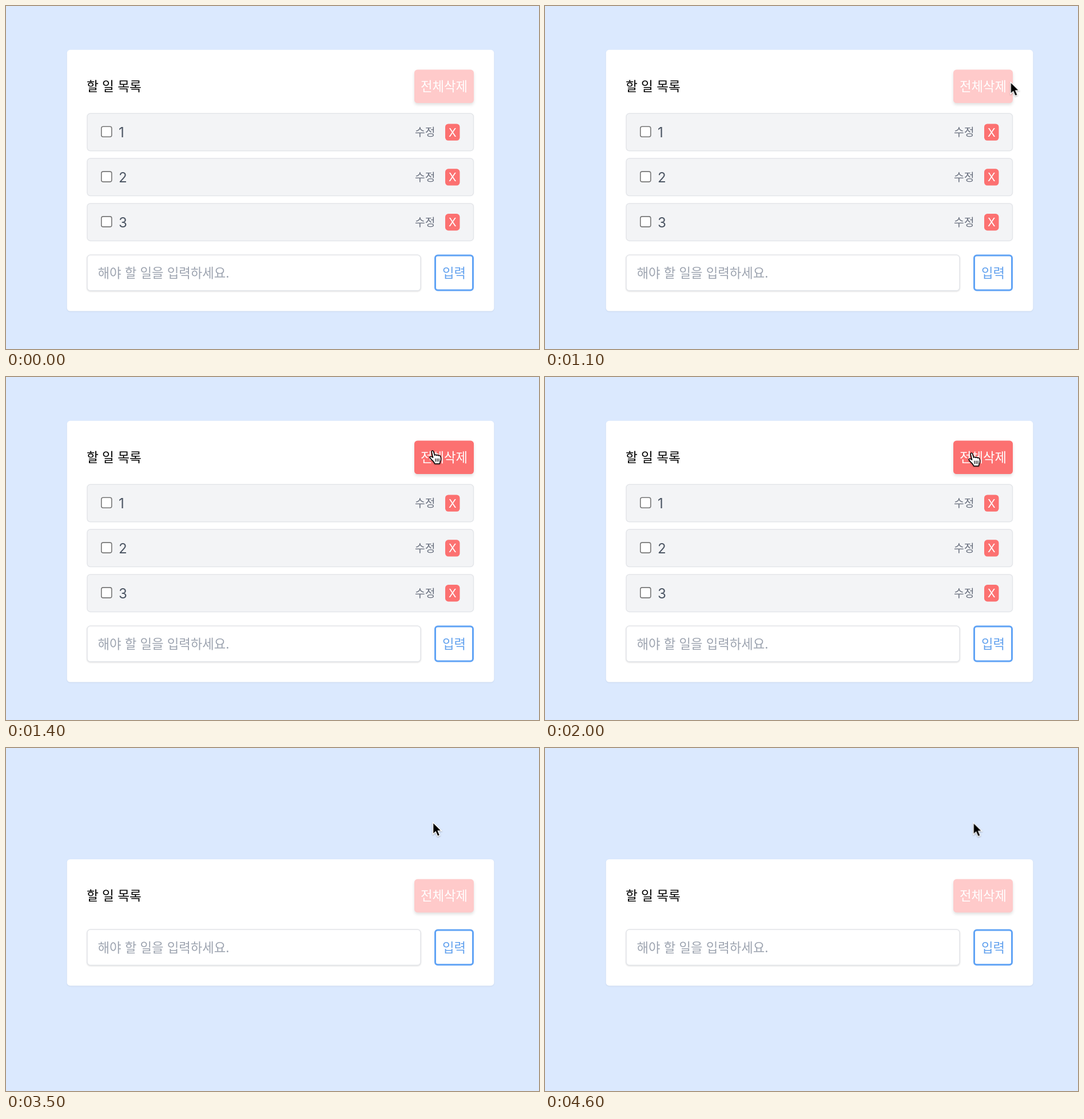
An HTML page that plays this animation: 932 px wide and 601 px high, repeating every 5000 ms.

```html
<!DOCTYPE html>
<html lang="ko">
<head>
<meta charset="utf-8">
<title>할 일 목록</title>
<style>
  html, body { margin: 0; width: 100%; height: 100%; overflow: hidden; background: #dbe9fe; }
  svg { display: block; width: 932px; height: 601px; }
  text { font: 22.3px "Noto Sans CJK KR", "Noto Sans CJK", "Noto Sans CJK JP", sans-serif; }
  .num { font: 24px Inter, sans-serif; fill: #4b5563; }
  .x { font: 20px Inter, sans-serif; fill: #fff; text-anchor: middle; }
  .edit { font-size: 19.3px; fill: #6b7280; }
  .hint { fill: #9ca3af; }
  .line { stroke: #e3e5e9; stroke-width: 1.5; }
  .card { fill: #fff; filter: drop-shadow(0 1px 1px rgb(0 0 0 / .07)); }
  .field { fill: #fff; filter: drop-shadow(0 1.5px 1.2px rgb(0 0 0 / .12)); }
  .clear { fill: #ffcaca; filter: drop-shadow(0 3px 2.5px rgb(0 0 0 / .12)); }
  .arrow, .hand { filter: drop-shadow(0 1px 1px rgb(0 0 0 / .3)); }

  .full, .short, .head, .foot, .clear, .cursor, .arrow, .hand {
    animation: 5s step-end infinite;
  }
  .full { animation-name: full; }
  .short { animation-name: short; }
  .head { animation-name: head; }
  .foot { animation-name: foot; }
  .clear { animation-name: hover; }
  .cursor { animation-name: move; }
  .arrow { animation-name: arrow; }
  .hand { animation-name: hand; }

  @keyframes full { 0% { visibility: visible } 50%, 100% { visibility: hidden } }
  @keyframes short { 0% { visibility: hidden } 50%, 100% { visibility: visible } }
  @keyframes head { 0% { transform: none } 50%, 100% { transform: translateY(118.2px) } }
  @keyframes foot { 0% { transform: none } 50%, 100% { transform: translateY(-118.2px) } }
  @keyframes hover { 0%, 50%, 100% { fill: #ffcaca } 24% { fill: #fc7171 } }
  @keyframes arrow {
    0%, 6%, 24% { visibility: hidden }
    2%, 12%, 50%, 100% { visibility: visible }
  }
  @keyframes hand { 0%, 50%, 100% { visibility: hidden } 24% { visibility: visible } }
  @keyframes move {
    0%, 2% { transform: translate(749px, 469px) }
    4% { transform: translate(779px, 285px) }
    12% { transform: translate(912px, 191px) }
    20% { transform: translate(866px, 345px) }
    22% { transform: translate(813.5px, 132px) }
    24% { transform: translate(762px, 130px) }
    26% { transform: translate(745px, 128.5px) }
    28% { transform: translate(740px, 128px) }
    36% { transform: translate(740px, 129px) }
    38% { transform: translate(740px, 131px) }
    40% { transform: translate(740px, 132px) }
    50% { transform: translate(746px, 129.5px) }
    70% { transform: translate(746px, 129px) }
    82% { transform: translate(745px, 127px) }
    84% { transform: translate(744.5px, 125px) }
    88% { transform: translate(745.5px, 126px) }
    92%, 100% { transform: translate(748.5px, 129.5px) }
  }
</style>
</head>
<body>
<svg viewBox="0 0 932 601">
  <defs>
    <g id="row">
      <rect class="line" x="142" y="188.3" width="675.5" height="65.5" rx="5.5" fill="#f3f4f6"/>
      <rect x="166.8" y="211.3" width="18" height="18" rx="3" fill="#fff" stroke="#767676" stroke-width="1.6"/>
      <text class="edit" x="715" y="228">수정</text>
      <rect x="768" y="206.5" width="25.5" height="29.3" rx="5.5" fill="#fc7171"/>
      <text class="x" x="780.8" y="228.5">X</text>
    </g>
  </defs>

  <rect class="card full" x="106.7" y="76.8" width="746.6" height="457.8" rx="5.5"/>
  <rect class="card short" x="106.7" y="195" width="746.6" height="221.4" rx="5.5"/>

  <g class="head">
    <text x="141" y="149.3" style="font-size:22.6px">할 일 목록</text>
    <rect class="clear" x="714" y="111.6" width="104" height="58.4" rx="5.5"/>
    <text x="725" y="149" fill="#fff">전체삭제</text>
  </g>

  <g class="full">
    <use href="#row"/>
    <use href="#row" y="78.8"/>
    <use href="#row" y="157.6"/>
    <text class="num" x="197" y="230">1</text>
    <text class="num" x="197" y="308.8">2</text>
    <text class="num" x="197" y="387.6">3</text>
  </g>

  <g class="foot">
    <rect class="field line" x="142" y="436.3" width="583" height="62.5" rx="5.5"/>
    <text class="hint" x="160.5" y="476">해야 할 일을 입력하세요.</text>
    <rect x="750.5" y="437.1" width="66" height="60.8" rx="4.5" fill="#fff" stroke="#60a3f5" stroke-width="3"/>
    <text x="763" y="476" fill="#60a0ee">입력</text>
  </g>

  <g class="cursor">
    <path class="arrow" d="M1.3 3V20.4L5.5 16.4L9.1 24.7L11.8 23.6L8.3 15.4H13.8Z"
      stroke="#fff" stroke-width="2.8" paint-order="stroke"/>
    <g class="hand" fill="#fff" stroke="#000" stroke-width="1.5" stroke-linecap="round" stroke-linejoin="round">
      <path d="M4.2 3.2C3.8 1.2 6.6 .4 7.4 2.4L9.6 9.2C10.4 8 12.4 8 13 9.4C14 8.4 15.8 8.6 16.4 10C17.6 9.2 19.4 9.6 19.8 11.2C20.6 13 21 15 20.4 17.4C20 19.6 18.6 21 18.4 24H9.6C9.2 21.6 6.4 19 4.6 17.2C3 15.6 1 13.4 1.2 12.4C1.6 10.8 4 11 6.6 13.2Z"/>
      <path d="M11 15.2L11.2 20M14 15L14.1 20M17 15V19.8" stroke-width="1.2"/>
    </g>
  </g>
</svg>
</body>
</html>
```
